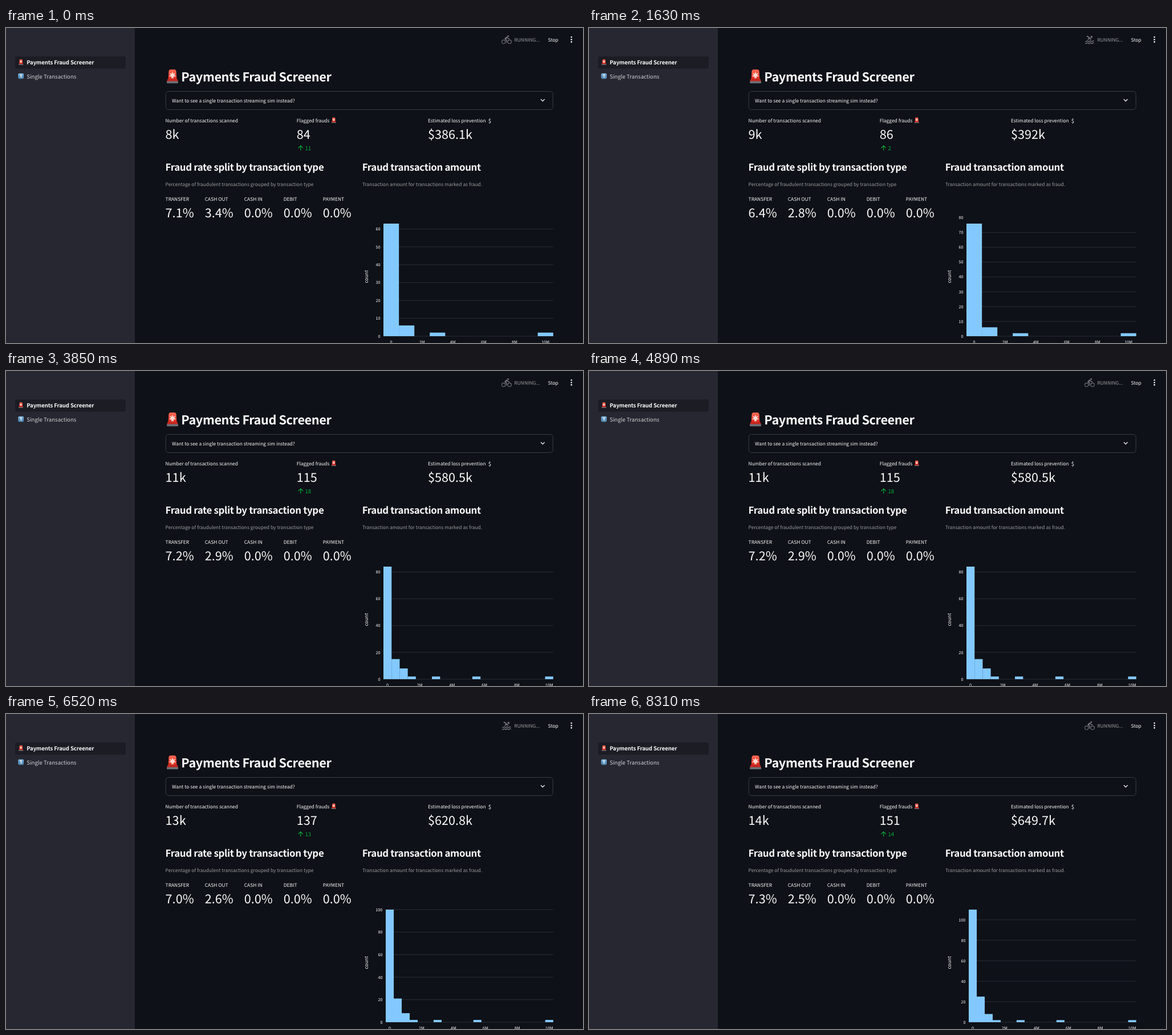
Write an HTML page that moves like this. It is 1012 px wide and 554 px high and loops after 8.46 s.

```html
<!DOCTYPE html>
<html lang="en">
<head>
<meta charset="utf-8">
<title>Payments Fraud Screener</title>
<style>
html, body { margin: 0; width: 100%; height: 100%; overflow: hidden; background: #0e1117; }
svg.stage { display: block; width: 1012px; height: 554px; }
text {
  font-family: "Noto Sans CJK JP", "Noto Sans CJK SC", "Noto Sans CJK KR", "Noto Sans CJK TC", "Noto Sans CJK", "Noto Sans", sans-serif;
  font-size: 8.43px; fill: #fafafa; text-rendering: geometricPrecision; white-space: pre;
}
.title { font-size: 21.67px; font-weight: 600; letter-spacing: -.018em; }
.head { font-size: 16.86px; font-weight: 600; letter-spacing: -.02em; }
.value { font-size: 21.67px; }
.nav { font-size: 9.63px; }
.nav.on { font-weight: 600; letter-spacing: -.013em; }
.nav.off { fill: #d0d0d3; }
.dim { fill: #9b9c9f; }
.tick { font-size: 7.23px; }
.end { text-anchor: end; }
.mid { text-anchor: middle; }
.delta { font-size: 9.63px; fill: #09ab3b; }
.line { fill: none; stroke: #fafafa; stroke-width: 1.3; }
#grid { stroke: #2b2d36; stroke-width: 1; }
#bars { fill: #83c9ff; }
#sport { fill: #6f7176; }
#sport .ring { fill: none; stroke: #6f7176; stroke-width: 1.5; }
</style>
</head>
<body>
<svg class="stage" viewBox="0 0 1012 554">
  <defs>
    <linearGradient id="red" x1="0" y1="0" x2="0" y2="1">
      <stop offset="0" stop-color="#ff6a55"/><stop offset="1" stop-color="#d8261c"/>
    </linearGradient>
    <linearGradient id="blue" x1="0" y1="0" x2="0" y2="1">
      <stop offset="0" stop-color="#7fb4dc"/><stop offset="1" stop-color="#4a80ac"/>
    </linearGradient>
    <symbol id="siren" viewBox="0 0 22 26">
      <path d="M3.4 19 4.4 4.5Q4.6 1 8 1h6q3.400 0 3.600 3.500L18.600 19z" fill="url(#red)"/>
      <path d="m11 4.500 1.300 4 4-1.600-2.300 3.700 3.200 2.500-4.200.4-.6 3.800-1.400-1.800-1.400 1.800-.6-3.800-4.200-.4L8 10.600 5.700 6.900l4 1.600z" fill="#ffd9d0"/>
      <path d="M2.600 17.500h16.800l1.600 4.500H1z" fill="#c3271f"/>
      <rect x="1" y="21.500" width="20" height="3.700" rx="1.300" fill="#6b7078"/>
    </symbol>
  </defs>

  <rect width="1012" height="554" fill="#0e1117"/>
  <rect width="226" height="554" fill="#262730"/>
  <rect x="16" y="50" width="194" height="21.500" rx="2.700" fill="#1b1c24"/>
  <use href="#siren" x="21.700" y="54.800" width="9" height="10.600"/>
  <text class="nav on" x="36.200" y="64.300">Payments Fraud Screener</text>
  <rect x="21.300" y="79.800" width="9.800" height="9.600" rx="1.800" fill="url(#blue)"/>
  <path d="M24.800 82.900 26.500 81.900V87.400" class="line"/>
  <text class="nav off" x="36.200" y="88.600">Single Transactions</text>

  <g id="sport" transform="translate(869 11.500) scale(.75)"></g>
  <text class="dim" x="891.400" y="23.600">RUNNING...</text>
  <text x="950.600" y="23.600">Stop</text>
  <g fill="#fafafa"><circle cx="991.700" cy="16" r="1.300"/><circle cx="991.700" cy="20.200" r="1.300"/><circle cx="991.700" cy="24.400" r="1.300"/></g>

  <use href="#siren" x="281" y="72" width="22" height="26"/>
  <text class="title" x="307.300" y="94">Payments Fraud Screener</text>
  <rect x="280.200" y="111.500" width="679" height="32" rx="5" fill="none" stroke="#3a3d43"/>
  <text x="291" y="130.500">Want to see a single transaction streaming sim instead?</text>
  <path class="line" d="m938 125.300 3.300 3.300 3.300-3.300"/>

  <text x="279.600" y="166">Number of transactions scanned</text>
  <text x="509.800" y="166">Flagged frauds</text>
  <use href="#siren" x="570.300" y="157" width="9" height="10.600"/>
  <text x="739.900" y="166">Estimated loss prevention</text>
  <text class="nav" x="845.700" y="166.600" font-weight="500">$</text>
  <text class="value" id="count" x="279.600" y="195"></text>
  <text class="value" id="flags" x="509.800" y="195"></text>
  <text class="value" id="loss" x="739.900" y="195"></text>
  <path d="M516.700 215.600V207m-4.200 4.200 4.200-4.200 4.200 4.200" fill="none" stroke="#09ab3b" stroke-width="1.200"/>
  <text class="delta" id="delta" x="524.500" y="214.600"></text>

  <text class="head" x="279.600" y="251.200">Fraud rate split by transaction type</text>
  <text class="head" x="624.700" y="251.200">Fraud transaction amount</text>
  <text class="dim" x="279.600" y="277.800">Percentage of fraudulent transactions grouped by transaction type</text>
  <text class="dim" x="624.900" y="277.800">Transaction amount for transactions marked as fraud.</text>
  <g id="rates"></g>

  <g id="grid"></g>
  <g id="bars"></g>
  <g id="labels"></g>
  <text class="mid" transform="translate(635 437.200) rotate(-90)">count</text>
</svg>
<script>
const LOOP = 8460, FRAMES = 57;
const $ = id => document.getElementById(id);

// Running indicator: the activities take turns, pausing one frame on each hold.
const holds = [2, 5, 10, 13, 17, 21, 25, 30, 34, 38, 42, 45, 50, 54];
const dot = (x, y, r = 2) => `<circle cx="${x}" cy="${y}" r="${r}"/>`;
const ring = x => `<circle class="ring" cx="${x}" cy="17" r="4.250"/>`;
const wave = y => `<path class="ring" style="stroke-width:2" d="M2 ${y}q1.700 2 3.300 0t3.300 0 3.400 0 3.300 0 3.300 0 3.400 0"/>`;
const path = d => `<path d="${d}"/>`;
const sports = [
  // bike
  dot(15.5, 3.5) + ring(5) + ring(19) + path('m10.8 10.5 2.4-2.4.8.8c1.3 1.3 3 2.1 5.1 2.1V9c-1.5 0-2.7-.6-3.6-1.5l-1.9-1.9c-.5-.4-1-.6-1.6-.6s-1.1.2-1.4.6L7.8 8.4c-.4.4-.6.9-.6 1.4 0 .6.2 1.1.6 1.4L11 14v5h2v-6.2z'),
  // run
  dot(13.5, 3.5) + path('m9.9 19.4 1-4.4 2.1 2v6h2v-7.500l-2.1-2 .6-3c1.3 1.5 3.3 2.5 5.5 2.5v-2c-1.9 0-3.5-1-4.3-2.4l-1-1.6c-.4-.6-1-1-1.7-1-.3 0-.5.1-.8.1L6 8.300V13h2V9.600l1.800-.7-1.600 8.100-4.900-1-.4 2z'),
  // swim
  dot(16.5, 5.5, 2.5) + wave(15.8) + wave(20.2) + path('m10 8-3.250 3.250c.8.300 1 .75 1.920.75 1.300 0 1.500-1 3.340-1s2 1 3.330 1c.800 0 1.100-.4 1.560-.590L10.480 5C8.930 3.450 7.500 3 5 3v2.500c1.820 0 2.890.4 4 1.500z'),
  // row
  dot(15, 3) + path('M8.500 14.500 4 19l1.500 1.500L9 17h2zM21 21l-3 3-3-3v-1.500l-7.100-7.100-.9.100v-2.200c1.660 0 3.600-.9 4.670-2l1.400-1.550C13.600 6.200 14.200 6 14.750 6 16 6 17 7 17 8.260V14c0 .84-.35 1.600-.92 2.160l-3.580-3.580v-2.270c-.63.52-1.430 1-2.290 1.390L16.500 18H18z'),
  // walk
  dot(13.5, 3.5) + path('M9.8 8.900 7 23h2.100l1.800-8 2.100 2v6h2v-7.500l-2.100-2 .6-3C14.800 12 16.800 13 19 13v-2c-1.900 0-3.500-1-4.300-2.400l-1-1.600c-.4-.6-1-1-1.700-1-.3 0-.5.100-.8.100L6 8.300V13h2V9.600z'),
  // wheelchair
  dot(18, 4.5) + path('M15 17h-2c0 1.650-1.350 3-3 3s-3-1.350-3-3 1.350-3 3-3v-2c-2.760 0-5 2.240-5 5s2.240 5 5 5 5-2.240 5-5zm3-3.500h-1.860l1.670-3.670C18.420 8.500 17.440 7 15.960 7h-5.200c-.81 0-1.540.47-1.870 1.200L8.220 10l1.920.53.650-1.530H13l-1.830 4.100c-.6 1.330.39 2.900 1.850 2.900H18v5h2v-5.500c0-1.100-.9-2-2-2z')
];

// Dashboard states: first frame, scanned, flagged, rise, loss, two rates
const states = [
  [0, '8k', 84, 11, '$386.1k', '7.1', '3.4'],
  [11, '9k', 86, 2, '$392k', '6.4', '2.8'],
  [18, '10k', 97, 11, '$422k', '6.4', '2.9'],
  [25, '11k', 115, 18, '$580.5k', '7.2', '2.9'],
  [34, '12k', 124, 9, '$603.7k', '6.9', '2.7'],
  [43, '13k', 137, 13, '$620.8k', '7.0', '2.6'],
  [54, '14k', 151, 14, '$649.7k', '7.3', '2.5']
];

// Histograms: first frame, bin total, tick step, top label, heights by bin
const charts = [
  [0, 11, 10, 60, { 0: 63, 1: 6, 3: 2, 10: 2 }],
  [1, 11, 10, 70, { 0: 74, 1: 6, 3: 2, 10: 2 }],
  [11, 11, 10, 80, { 0: 76, 1: 6, 3: 2, 10: 2 }],
  [18, 21, 10, 70, { 0: 74, 1: 11, 2: 6, 3: 2, 6: 2, 20: 2 }],
  [25, 21, 20, 80, { 0: 84, 1: 15, 2: 8, 3: 2, 6: 2, 11: 2, 20: 2 }],
  [34, 21, 20, 80, { 0: 90, 1: 18, 2: 8, 3: 2, 6: 2, 11: 2, 20: 2 }],
  [43, 21, 20, 100, { 0: 100, 1: 21, 2: 8, 3: 2, 6: 2, 11: 2, 20: 2 }],
  [54, 21, 20, 100, { 0: 110, 1: 25, 2: 8, 3: 2, 6: 2, 11: 2, 20: 2 }]
];

const label = (x, y, cls, s) => `<text x="${x}" y="${y}" class="${cls}">${s}</text>`;
const current = (list, k) => list.filter(s => s[0] <= k).pop();

function drawMetrics([, count, flags, rise, loss, transfer, cashOut]) {
  $('count').textContent = count;
  $('flags').textContent = flags;
  $('delta').textContent = rise;
  $('loss').textContent = loss;
  const rates = { 'TRANSFER': transfer, 'CASH OUT': cashOut, 'CASH IN': '0.0', 'DEBIT': '0.0', 'PAYMENT': '0.0' };
  $('rates').innerHTML = Object.entries(rates).map(([name, rate], i) => {
    const x = 279.6 + 69.05 * i;
    return label(x, 304.3, '', name) + label(x, 333.3, 'value', rate + '%');
  }).join('');
}

function drawChart([, bins, step, top, heights]) {
  const left = top > 99 ? 666 : 662, right = 959.7, base = 542;
  const max = heights[0], w = (right - left) / bins;
  const y = v => base - v * 198 / max;
  let grid = '', bars = '', text = '';
  for (let v = 0; v <= top; v += step) {
    if (v <= max) grid += `<path d="M${left} ${y(v)}H${right}"/>`;
    text += label(left - 5.6, y(v) + 2.7, 'tick end', v);
  }
  for (const [i, n] of Object.entries(heights))
    bars += `<rect x="${left + i * w}" y="${y(n)}" width="${w + .1}" height="${base - y(n)}"/>`;
  for (let m = 0; m <= 10; m += 2)
    text += label(left + w * (.5 + m * (bins - 1) / 10), 555.4, 'tick mid', m ? m + 'M' : '0');
  $('grid').innerHTML = grid;
  $('bars').innerHTML = bars;
  $('labels').innerHTML = text;
}

const shown = {};
function show(key, value, draw) {
  if (shown[key] === value) return;
  shown[key] = value;
  draw(value);
}

function tick() {
  const k = Math.floor((performance.now() % LOOP + 2) / LOOP * FRAMES) % FRAMES;
  const turn = k - holds.filter(h => h <= k).length;
  show('sport', sports[turn % sports.length], s => $('sport').innerHTML = s);
  show('metrics', current(states, k), drawMetrics);
  show('chart', current(charts, k), drawChart);
  requestAnimationFrame(tick);
}
tick();
</script>
</body>
</html>
```
